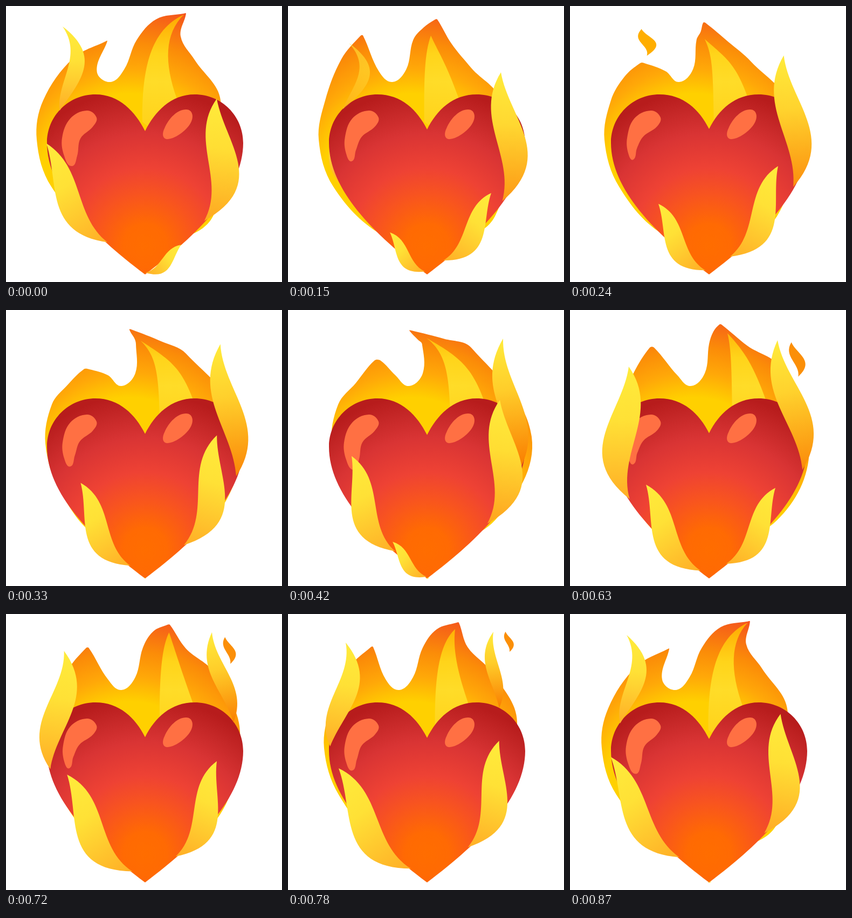
An HTML page with a canvas that plays this animation: 512 px wide and 512 px high, repeating every 900 ms.

```html
<!DOCTYPE html>
<html lang="en">
<head>
<meta charset="utf-8">
<title>Burning heart</title>
<style>
  html, body { margin: 0; width: 100%; height: 100%; overflow: hidden; background: #fff; }
  canvas { display: block; width: 512px; height: 512px; }
</style>
</head>
<body>
<canvas id="stage" width="512" height="512"></canvas>
<script>
const ctx = document.getElementById('stage').getContext('2d');
const LOOP = 900, STEP = 30, AXIS = 258, LEFT = -1, RIGHT = 1;

// ---- Key points: [time, x, y, ...] ----

const leftPeakKeys = cyclic([
  [0, 187,64], [150, 137,54], [240, 134,105], [420, 166,93], [630, 152,69], [780, 156,60]
]);
// right peak, shoulder below it, hip beside the heart
const rightPeakKeys = cyclic([
  [0, 332,13, 350,100, 398,175],
  [150, 275,24, 340,115, 394,178],
  [420, 227,37, 340,70, 452,235],
  [630, 279,26, 390,107, 444,260],
  [780, 315,15, 378,108, 425,200]
]);
const innerTipKeys = cyclic([
  [0, 330,16], [150, 265,55], [420, 257,52], [630, 292,43], [780, 310,28]
]);

// Tongues climb the heart: [time, tip x, tip y, place of the base on the heart's edge]
const tongues = [
  {
    side: LEFT, bend: .45, heat: 0,
    keys: [
      [60, 256,497, 0], [150, 189,420, .02], [240, 164,367, .03], [420, 118,271, .215],
      [630, 109,105, .615], [780, 107,53, 1.05], [900, 105,38, 1.45], [1110, 117,85, 1.45]
    ]
  },
  {
    side: LEFT, bend: 0, heat: 0, sinksAt: .75,
    keys: [
      [330, 256,497, 0], [420, 194,430, .01], [630, 141,324, .06],
      [900, 75,255, .255], [1050, 103,187, .69], [1140, 112,175, .75]
    ]
  },
  {
    side: RIGHT, bend: .15, heat: 1,
    keys: [
      [420, 262,497, 0], [450, 325,443, .01], [630, 381,330, .115], [900, 391,172, .42],
      [1050, 395,123, .57], [1320, 399,53, .86], [1470, 402,85, .9]
    ]
  },
  {
    side: RIGHT, bend: .15, heat: 1,
    keys: [
      [-30, 262,497, 0], [0, 325,443, .01], [150, 377,347, .11], [240, 386,297, .14],
      [420, 393,167, .43], [630, 385,56, .83], [780, 381,33, 1.68], [870, 382,60, 1.75]
    ]
  }
];
const sparks = [
  { born: 170, dies: 330, from: [136, 85], to: [140, 45], size: 33, width: 2, color: '#ffae00' },
  { born: 480, dies: 860, from: [427, 132], to: [402, 30], size: 41, width: 1.3, color: '#fb8f08' }
];

// ---- Maths ----

function cyclic(keys) {
  const shift = (rows, by) => rows.map(([t, ...v]) => [t + by, ...v]);
  return [...shift(keys.slice(-2), -LOOP), ...keys, ...shift(keys.slice(0, 2), LOOP)];
}

// Smooth value of all columns at a time; null outside the keys.
function sample(keys, t) {
  const n = keys.findIndex(k => k[0] > t);
  if (n < 1) return null;
  const a = keys[n - 1], b = keys[n], h = b[0] - a[0], u = (t - a[0]) / h, w = 1 - u;
  const slope = (p, q, c) => (q[c] - p[c]) / (q[0] - p[0]);
  const tangent = (i, c) => {
    const p = keys[i - 1], k = keys[i], q = keys[i + 1];
    if (!p) return slope(k, q, c);
    if (!q) return slope(p, k, c);
    const before = k[0] - p[0], after = q[0] - k[0];
    return (slope(p, k, c) * after + slope(k, q, c) * before) / (before + after);
  };
  return a.slice(1).map((v, j) => {
    const c = j + 1;
    return v * w * w * (1 + 2 * u) + b[c] * u * u * (3 - 2 * u)
      + h * u * w * (tangent(n - 1, c) * w - tangent(n, c) * u);
  });
}

const mix = (a, b, u) => a + (b - a) * u;
const mixAll = (a, b, u) => a.map((v, i) => mix(v, b[i], u));
const ramp = (u, from, to) => Math.max(0, Math.min(1, (u - from) / (to - from)));
const rgb = c => `rgb(${c.map(Math.round).join()})`;

// ---- Heart outline, one half as distances from the axis ----

const lobe = [[182, 254], [182, 204], [142, 164], [92, 164]];
const flank = [[182, 254], [182, 340], [100, 423], [0, 498]];

// 0 is the bottom tip, 1 the widest place, 2 the top of the lobe.
function heartEdge(place, side) {
  const [curve, u] = place < 1 ? [flank, 1 - place] : [lobe, place - 1];
  const w = 1 - u, weights = [w * w * w, 3 * u * w * w, 3 * u * u * w, u * u * u];
  const along = axis => curve.reduce((sum, p, i) => sum + p[axis] * weights[i], 0);
  return [AXIS + side * (along(0) - 2), along(1) - 1];
}

function traceHeart(beat) {
  const notch = 232 - 4 * beat;
  ctx.beginPath();
  for (const side of [LEFT, RIGHT]) {
    const curve = (...points) => ctx.bezierCurveTo(...points.flatMap(([x, y]) => [AXIS + side * x, y]));
    ctx.moveTo(AXIS, notch);
    curve([18, notch - 36], [48, 164], lobe[3]);
    curve(lobe[2], lobe[1], lobe[0]);
    curve(flank[1], flank[2], flank[3]);
    ctx.closePath();
  }
}

// ---- Painting ----

// Closed smooth curve through all points.
function trace(points) {
  const at = i => points[(i + points.length) % points.length];
  const direction = i => {
    const [x0, y0] = at(i - 1), [x1, y1] = at(i + 1);
    const length = Math.hypot(x1 - x0, y1 - y0) || 1;
    return [(x1 - x0) / length, (y1 - y0) / length];
  };
  ctx.beginPath();
  ctx.moveTo(...points[0]);
  points.forEach((p, i) => {
    const q = at(i + 1), d = direction(i), e = direction(i + 1);
    const r = Math.hypot(q[0] - p[0], q[1] - p[1]) * .35;
    ctx.bezierCurveTo(p[0] + d[0] * r, p[1] + d[1] * r, q[0] - e[0] * r, q[1] - e[1] * r, ...q);
  });
}

function fill(style) {
  ctx.fillStyle = style;
  ctx.fill();
}

function shade(gradient, stops) {
  stops.forEach(([offset, color]) => gradient.addColorStop(offset, color));
  return gradient;
}

const flameFill = shade(ctx.createRadialGradient(230, 330, 0, 230, 330, 335), [
  [.5, '#ffd000'], [.64, '#ffa808'], [.78, '#fb8c08'], [1, '#f4511e']
]);
const innerFill = shade(ctx.createLinearGradient(0, 15, 0, 225), [
  [0, '#ffa800'], [.35, '#ffd41a'], [.6, '#ffdc28'], [1, '#ffd21a']
]);
const heartFill = shade(ctx.createRadialGradient(AXIS, 445, 0, AXIS, 445, 290), [
  [0, '#ff6d00'], [.14, '#ff6a03'], [.33, '#f8541f'], [.5, '#ee4234'],
  [.72, '#d93434'], [.87, '#c62828'], [1, '#b71c1c']
]);
const shineColor = '#ff7043';
const smallShine = new Path2D('M334 192C346 192 349 205 343 216C335 232 312 247 299 247'
  + 'C289 246 290 235 294 227C302 208 318 192 334 192Z');

// S-shaped lick of flame; the offsets scale with the distance from tip to base.
function traceLick(tip, base, side, width, bend = 0) {
  const dx = base[0] - tip[0], dy = base[1] - tip[1];
  const point = (along, out) => [
    tip[0] + dx * along + side * dy * out,
    tip[1] + dy * along - side * dx * out
  ];
  ctx.beginPath();
  ctx.moveTo(...tip);
  ctx.bezierCurveTo(...point(.35, .1 * width - bend), ...point(.65, .5 * width - bend), ...base);
  ctx.bezierCurveTo(...point(.65, .15 * width - bend), ...point(.35, -.2 * width - bend), ...tip);
}

function drawBody(t) {
  const phase = 2 * Math.PI * t / LOOP;
  const lean = Math.cos(phase), sway = Math.cos(phase - Math.PI / 6);
  const [px, py] = sample(leftPeakKeys, t);
  const [rx, ry, shoulderX, shoulderY, hipX, hipY] = sample(rightPeakKeys, t);
  const waist = 70 - 15 * sway, dip = 210 - 19 * sway;
  const blunt = 3.5 - 2.5 * lean, curl = (rx - 255) * .22;
  const neck = dip + 24 + .18 * (rx - dip);
  trace([
    [170, 422], [waist + 27, 335], [waist, 248], [waist + 12, 175],
    [(waist + 12 + px) / 2 - 4, (175 + py) / 2 - 10 - 12 * lean],
    [px - blunt, py + 1], [px + blunt, py + 1],
    [dip - 25, 121], [dip, 141], [dip + 26, 117], [neck, 63],
    [(neck + rx - curl) / 2, (63 + ry) / 2 - .8 * curl],
    [rx - 2, ry + 1], [rx + 2, ry + 1],
    [(rx + shoulderX) / 2 - curl, (ry + shoulderY) / 2],
    [shoulderX, shoulderY], [hipX, hipY], [384, 390], [AXIS, 440]
  ]);
  fill(flameFill);

  const [tx, ty] = sample(innerTipKeys, t), root = 311 - 30 * sway;
  ctx.beginPath();
  ctx.moveTo(tx, ty);
  ctx.bezierCurveTo(mix(tx, root, .8), ty + 35, root + 8, 105, root + 32, 172);
  ctx.lineTo(root, 240);
  ctx.lineTo(root - 32, 215);
  ctx.bezierCurveTo(root - 33, 115, mix(tx, root - 32, .8), ty + 28, tx, ty);
  fill(innerFill);
}

function drawHeart(t) {
  const beat = (1 - Math.cos(4 * Math.PI * t / LOOP)) / 2;
  traceHeart(beat);
  fill(heartFill);
  ctx.fillStyle = shineColor;
  ctx.fill(smallShine);
  trace([
    [150, 194], [168, 207], [161, 224], [138 - 2 * beat, 246 - 4 * beat],
    [132 - 8 * beat, 278 - 14 * beat], [122 - 5 * beat, 297 - 12 * beat],
    [108, 278 - 5 * beat], [104 + 2 * beat, 245], [119, 209]
  ]);
  fill(shineColor);
}

function drawTongue({ keys, side, bend, heat, sinksAt = 1 }, time, behind) {
  const state = sample(keys, time);
  if (!state) return;
  const age = ramp(time, keys[0][0], keys[keys.length - 1][0]);
  if (behind !== age > sinksAt) return;
  const [x, y, place] = state, tip = [x, y], base = heartEdge(place, side);
  const old = ramp(age, .5, .9), hot = heat * ramp(age, .4, .85);
  ctx.globalAlpha = 1 - ramp(age, .9, 1);
  traceLick(tip, base, side, 1 - .3 * old, bend * old);
  fill(shade(ctx.createLinearGradient(...tip, ...base), [
    [0, '#ffeb3b'],
    [.4, rgb(mixAll([255, 225, 54], [255, 205, 42], hot))],
    [1, rgb(mixAll([255, 174, 38], [250, 125, 0], hot))]
  ]));
  ctx.globalAlpha = 1;
}

function drawTongues(t, behind) {
  for (const tongue of tongues) {
    for (const time of [t + LOOP, t, t - LOOP]) drawTongue(tongue, time, behind);
  }
}

function drawSpark({ born, dies, from, to, size, width, color }, t) {
  if (t < born || t >= dies) return;
  const age = ramp(t, born, dies), [x, y] = mixAll(from, to, age);
  const half = size * Math.sqrt(1 - age);
  traceLick([x - half / 5, y - half], [x + half / 5, y + half], RIGHT, width, .05 * width);
  fill(color);
}

function draw(t) {
  ctx.fillStyle = '#fff';
  ctx.fillRect(0, 0, 512, 512);
  drawBody(t);
  drawTongues(t, true);
  drawHeart(t);
  sparks.forEach(spark => drawSpark(spark, t));
  drawTongues(t, false);
}

const start = performance.now();
function tick() {
  const elapsed = Math.max(0, performance.now() - start) % LOOP;
  draw(Math.floor(elapsed / STEP) * STEP);
  requestAnimationFrame(tick);
}
tick();
</script>
</body>
</html>
```
